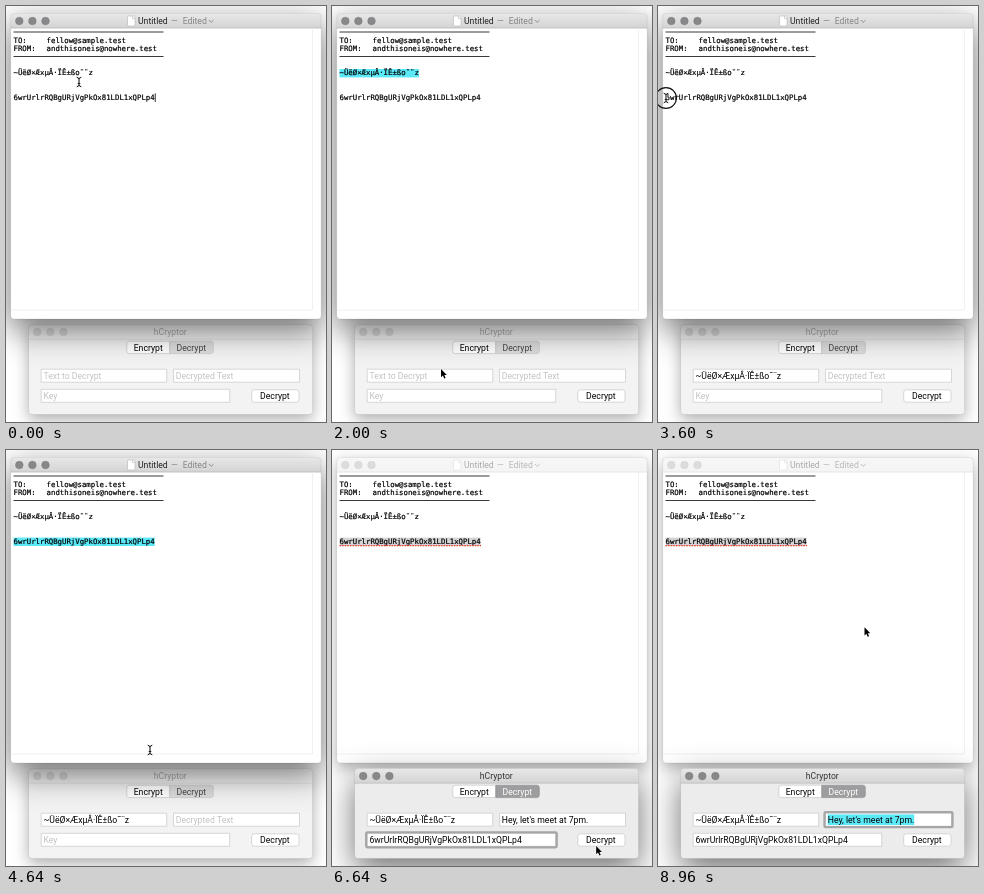
An HTML page with a canvas for the animation above (9.36 s loop, 320 px wide and 416 px high).

```html
<!DOCTYPE html>
<html lang="en">
<head>
<meta charset="utf-8">
<style>
  html, body { margin: 0; width: 100%; height: 100%; overflow: hidden; background: #fff; }
  canvas { display: block; }
</style>
</head>
<body>
<canvas id="stage" width="320" height="416"></canvas>
<script>
const ctx = document.getElementById('stage').getContext('2d');
const LOOP = 9360, STEP = 80;
const UI = '8.67px Roboto, sans-serif';
const MONO = '7.33px "DejaVu Sans Mono", monospace';
const CIPHER = '~ÜëØ×ÆxµÂ·ÏÊ±ßo¯¨z';
const KEY = '6wrUrlrRQBgURjVgPkOx81LDL1xQPLp4';
const MESSAGE = "Hey, let's meet at 7pm.";
const LEFT = 7.5, CHAR = 4.413;
const CYAN = '#5be9f8';

// What happens when, in ms
const CUE = {
  pressCipher: 640, dragCipher: 960, dropCipher: 1440,
  openCryptor: 2160, pasteCipher: 2800,
  openEditor: 3520, selectKey: 4000,
  focusKey: 5360, pasteKey: 5760, pressDecrypt: 5840, solve: 6640,
  dragMessage: 7440, dropMessage: 7760
};

const within = (v, a, b) => v >= a && v < b;
const clamp = (v, a, b) => Math.min(b, Math.max(a, v));
const smooth = k => k * k * (3 - 2 * k);
const mix = (a, b, k) => a + (b - a) * k;
const bezier = (a, b, c, d, k) =>
  mix(mix(mix(a, b, k), mix(b, c, k), k), mix(mix(b, c, k), mix(c, d, k), k), k);

// Each glide leads the pointer from where it rests to a new place
const glide = (start, end, x, y, bend) => ({ start, end, x, y, bend });
const GLIDES = [
  glide(0, CUE.pressCipher, 8, 67),
  glide(CUE.dragCipher, 1360, 124, 68),
  glide(1520, 2000, 109, 363),
  glide(2320, 2560, 105, 382),
  glide(2960, 3040, 110, 313),
  glide(3040, CUE.openEditor, 8, 92),
  glide(4160, 4640, 144, 300),
  glide(4720, CUE.focusKey, 169, 391),
  glide(5680, CUE.pressDecrypt, 264, 397),
  glide(6560, 7280, 269, 369),
  glide(CUE.dragMessage, CUE.dropMessage, 157, 366),
  glide(8160, 8960, 206.5, 177.3, [-90, 400, 350, -10])
];

function pointerAt(t) {
  let x = 73, y = 76;
  for (const g of GLIDES) {
    if (t < g.start) break;
    const k = smooth(clamp((t - g.start) / (g.end - g.start), 0, 1));
    const [bx, by, cx, cy] = g.bend || [x, y, g.x, g.y];
    const shift = g.bend ? (a, b, c, d) => bezier(a, b, c, d, k) : (a, b, c, d) => mix(a, d, k);
    [x, y] = [shift(x, bx, cx, g.x), shift(y, by, cy, g.y)];
  }
  return [x, y];
}

function isPressed(t) {
  return within(t, CUE.pressCipher, CUE.dropCipher)
    || within(t, CUE.dragMessage, CUE.dropMessage)
    || [CUE.openCryptor - STEP, CUE.openEditor, CUE.focusKey, CUE.pressDecrypt].some(c => within(t, c, c + 240));
}

function rect(x, y, w, h, fill) {
  ctx.fillStyle = fill;
  ctx.fillRect(x, y, w, h);
}

function box(x, y, w, h, r, fill, stroke, width = 0.7) {
  ctx.beginPath();
  ctx.roundRect(x, y, w, h, r);
  if (fill) { ctx.fillStyle = fill; ctx.fill(); }
  if (stroke) { ctx.strokeStyle = stroke; ctx.lineWidth = width; ctx.stroke(); }
}

function disc(x, y, r, fill, stroke, width) {
  box(x - r, y - r, 2 * r, 2 * r, r, fill, stroke, width);
}

function line(points, color, width) {
  ctx.beginPath();
  points.forEach(([x, y]) => ctx.lineTo(x, y));
  ctx.strokeStyle = color;
  ctx.lineWidth = width;
  ctx.stroke();
}

function text(str, x, y, color = '#000', align = 'left') {
  ctx.font = UI;
  ctx.textAlign = align;
  ctx.fillStyle = color;
  ctx.fillText(str, x, y);
}

// Thin outline gives the slightly heavier look of the editor type
function mono(str, x, y) {
  ctx.font = MONO;
  ctx.textAlign = 'left';
  ctx.fillStyle = ctx.strokeStyle = '#000';
  ctx.lineWidth = 0.2;
  ctx.fillText(str, x, y);
  ctx.strokeText(str, x, y);
}

function windowFrame(x, y, w, h, body, active) {
  ctx.save();
  ctx.shadowColor = active ? 'rgba(0,0,0,.56)' : 'rgba(0,0,0,.32)';
  ctx.shadowBlur = active ? 32 : 15;
  ctx.shadowOffsetY = active ? 11 : 5;
  box(x, y, w, h, 3.5, body);
  ctx.restore();
  const bar = ctx.createLinearGradient(0, y, 0, y + 14.7);
  bar.addColorStop(0, active ? '#e8e8e8' : '#f7f7f7');
  bar.addColorStop(1, active ? '#d3d3d3' : '#f4f4f4');
  box(x, y, w, 14.7, [3.5, 3.5, 0, 0], bar);
  rect(x, y + 14.2, w, 0.6, active ? '#b4b4b4' : '#dadada');
  box(x, y, w, h, 3.5, null, 'rgba(0,0,0,.16)', 0.5);
  for (let i = 0; i < 3; i++) {
    disc(x + 8.6 + i * 13.1, y + 7.5, 3.8, active ? '#88888b' : '#dcdcdc', active ? '#777779' : '#d2d2d2', 0.5);
  }
}

function drawEditor(t, active, px) {
  windowFrame(4.7, 7.5, 310.5, 305.5, '#fff', active);
  const gray = active ? '#858585' : '#b9b9b9';
  const edge = active ? '#b5b5b5' : '#dedede';
  box(121.5, 10, 7.5, 10, 0.5, '#fff', edge, 0.6);
  line([[126.5, 10], [126.5, 12.5], [129, 12.5]], edge, 0.6);
  text('Untitled', 132, 18.2, active ? '#222' : '#aaa');
  text('—', 165, 18.2, gray);
  text('Edited', 200.8, 18.2, gray, 'right');
  line([[202.8, 14], [205.2, 16.4], [207.6, 14]], gray, 0.9);
  line([[306.5, 22], [306.5, 304], [5, 304]], '#ececec', 0.8);

  const highlight = active ? CYAN : '#d4d4d4';
  if (within(t, CUE.dragCipher, CUE.openEditor)) {
    const reach = t < CUE.dropCipher ? Math.round((px - LEFT) / CHAR) : CIPHER.length;
    rect(LEFT, 63, clamp(reach, 0, CIPHER.length) * CHAR, 8.4, highlight);
  }
  if (t >= CUE.selectKey) rect(LEFT, 87.6, KEY.length * CHAR, 8.4, highlight);

  for (const y of [26, 50.5]) line([[LEFT, y], [157.5, y]], '#222', 0.9);
  const rowAt = row => 36.7 + row * 8.18;
  mono('TO:', LEFT, rowAt(0));
  mono('fellow@sample.test', 40.6, rowAt(0));
  mono('FROM:', LEFT, rowAt(1));
  mono('andthisoneis@nowhere.test', 40.6, rowAt(1));
  mono(CIPHER, LEFT, rowAt(4));
  mono(KEY, LEFT, rowAt(7));

  if (t < CUE.pressCipher) rect(148.8, 87.3, 0.8, 8.7, '#000');
  if (t >= CUE.focusKey) {
    ctx.setLineDash([1.6, 1]);
    line([[LEFT, 95.6], [149, 95.6]], '#f03a30', 1.4);
    ctx.setLineDash([]);
  }
}

// Input box; its focus ring zooms in during the first moments after focusAge 0
function drawField(x, y, w, value, hint, focusAge, caret, selectFrom) {
  box(x, y, w, 13, 0, '#fff', '#c8c8c8', 0.7);
  if (focusAge >= 0) {
    const grow = 10 * Math.max(0, 1 - focusAge / 240);
    const pad = 1 + grow;
    ctx.globalAlpha = 1 - grow / 10;
    box(x - pad, y - pad, w + pad * 2, 13 + pad * 2, 1.2, null, '#a6a6a8', 2.3);
    ctx.globalAlpha = 1;
  }
  ctx.font = UI;
  const start = x + 2.2, end = start + ctx.measureText(value).width;
  if (selectFrom < end) {
    const from = Math.max(start, selectFrom);
    rect(from, y + 1.2, end - from, 10.6, CYAN);
  }
  text(value || hint, start, y + 9.9, value ? '#000' : '#c2c2c2');
  if (caret) rect(end, y + 1.5, 0.8, 10, '#000');
}

function drawCryptor(t, active, px) {
  windowFrame(22.6, 318.6, 284, 90, active ? '#ececec' : '#f3f3f3', active);
  text('hCryptor', 164.3, 329, active ? '#333' : '#a8a8a8', 'center');

  const edge = '#c8c8c8';
  box(120.8, 335.2, 43, 12.4, [2.5, 0, 0, 2.5], '#fff', edge);
  box(163.8, 335.2, 43.5, 12.4, [0, 2.5, 2.5, 0], active ? '#9d9d9f' : '#dcdcdc', active ? '#929294' : edge);
  text('Encrypt', 142.2, 344.5, '#000', 'center');
  text('Decrypt', 185.3, 344.5, active ? '#fff' : '#444', 'center');

  const { openCryptor, openEditor, focusKey, dragMessage, dropMessage } = CUE;
  const focus = (a, b) => within(t, a, b) ? t - a : -1;
  const shown = (cue, value) => t >= cue ? value : '';
  const selectFrom = t <= dragMessage ? Infinity : t < dropMessage ? px : 0;
  drawField(35.2, 363.2, 125.5, shown(CUE.pasteCipher, CIPHER), 'Text to Decrypt',
    focus(openCryptor, openEditor), within(t, openCryptor, openEditor));
  drawField(167.5, 363.2, 126, shown(CUE.solve, MESSAGE), 'Decrypted Text',
    focus(dragMessage, LOOP), t === dragMessage, selectFrom);
  drawField(35.2, 383.3, 188.5, shown(CUE.pasteKey, KEY), 'Key',
    focus(focusKey, dragMessage), within(t, focusKey, CUE.pressDecrypt + 240));

  box(245.7, 383.8, 47.3, 12.4, 2.5, '#fff', edge);
  text('Decrypt', 268.9, 393.2, '#000', 'center');
}

function drawPointer(t, x, y, cryptorActive) {
  const overText = cryptorActive
    ? (within(x, 35, 225) && within(y, 362, 398)) || (within(x, 167, 295) && within(y, 362, 377))
    : within(y, 22, 304);
  ctx.save();
  ctx.translate(x, y);
  if (overText) {
    const beam = [[0, -3.5], [0, 3.5]];
    line(beam, '#fff', 2.2);
    line(beam, '#000', 1);
    for (const s of [-1, 1]) line([[-2.3, 4.8 * s], [0, 3.5 * s], [2.3, 4.8 * s]], '#000', 1);
    line([[-1.3, 1.5], [1.3, 1.5]], '#000', 0.8);
  } else {
    const arrow = new Path2D('M0 0V8.3L1.9 6.5L3.2 9.5L4.6 8.9L3.3 6H5.8Z');
    ctx.fillStyle = '#000';
    ctx.strokeStyle = '#fff';
    ctx.lineWidth = 1;
    ctx.stroke(arrow);
    ctx.fill(arrow);
  }
  if (isPressed(t)) disc(0, 0, 10.4, null, '#111', 1.2);
  ctx.restore();
}

function draw(now) {
  const t = Math.floor((now % LOOP) / STEP) * STEP;
  const [x, y] = pointerAt(t);
  const cryptorActive = within(t, CUE.openCryptor, CUE.openEditor) || t >= CUE.focusKey;
  rect(0, 0, 320, 416, '#fff');
  // The active window lies on top
  const layers = [drawCryptor, drawEditor];
  if (cryptorActive) layers.reverse();
  layers.forEach((paint, i) => paint(t, i === 1, x));
  drawPointer(t, x, y, cryptorActive);
}

const begin = performance.now();
function tick() {
  draw(performance.now() - begin);
  requestAnimationFrame(tick);
}
tick();
</script>
</body>
</html>
```
